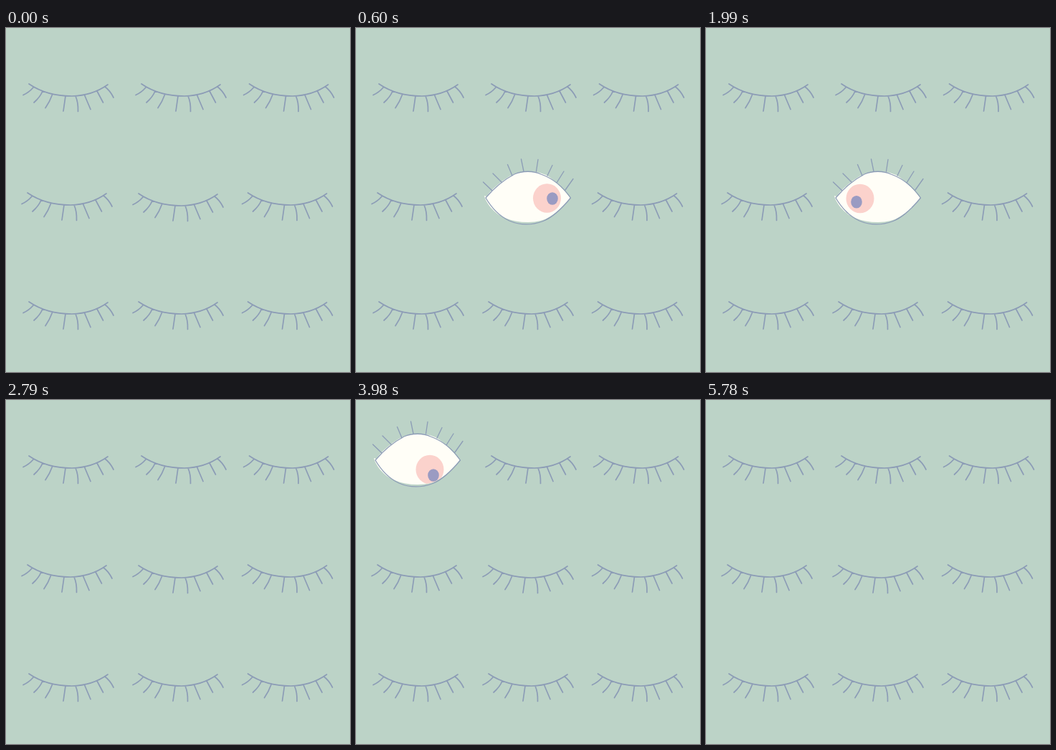
An HTML page that plays this animation: 480 by 480 pixels, repeating every 6.16 s.

```html
<!DOCTYPE html>
<html lang="en">
<head>
<meta charset="utf-8">
<title>Blinking eyes</title>
<style>
  html, body { margin: 0; height: 100%; overflow: hidden; background: #bcd3c7; }
  svg { display: block; width: 100vw; height: 100vh; }
  .line { fill: none; stroke: #8c9cb6; stroke-width: 1.7; stroke-linecap: round; stroke-linejoin: round; }
  .thin { stroke-width: 1.3; }
  .white { fill: #fffef7; }
  .iris { fill: #fbd2cc; }
  .pupil { fill: #9a9bc2; }
</style>
</head>
<body>
<svg viewBox="0 0 480 480">
  <defs>
    <path id="closed" class="line" d="M32 78C48 89 70 95 92 95C113 94.5 128 89 142 79
      M38 83Q32 90 24 93.5M51 88Q48 96 39 104M65 92Q61 103 55 111.5M83 95L80 116
      M97 95Q101 104 100.5 116.5M109.5 93.5L118 113.5M127 88L135.5 104M138 82Q145 87 150 97"/>
    <path id="openWhite" d="M25 81C27 90 38 106 54 112Q68 118 86 118Q105 118 117 110Q133 101 145 84
      Q131 66 116 55Q104 47 86 47Q67 47 51 60Q37 70 28 82Z"/>
    <path id="halfWhite" d="M28 81L41 73Q50 70 65 69Q90 66.500 115 70Q133 74 145 81Q130 88 113 93Q90 97 64 96Q45 89 28 81Z"/>
    <clipPath id="openClip"><use href="#openWhite"/></clipPath>
    <clipPath id="halfClip"><use href="#halfWhite"/></clipPath>
  </defs>

  <g id="lids"></g>

  <g id="open">
    <use href="#openWhite" class="white"/>
    <g clip-path="url(#openClip)">
      <ellipse id="iris" class="iris" rx="19.5" ry="20.3"/>
      <ellipse id="pupil" class="pupil" rx="7.8" ry="8.8"/>
    </g>
    <path class="line thin" d="M27 84C38 71 50 60 67 51C78 46 94 46 104 51C121 57 135 69 145.500 84
      C134 98 121 111 107 116.500C91 122.500 74 122 60 116C45 109 34 96 27 84Z
      M36 74L23.500 62M49 62L37 50M64 53L57.500 37.500M80 47L76.500 30M97.500 47L100 30.500
      M113 53L120 38.500M126 63L136 47M138 73L149 57.500"/>
  </g>

  <g id="half">
    <use href="#halfWhite" class="white"/>
    <g clip-path="url(#halfClip)">
      <ellipse class="iris" cx="111.500" cy="83" rx="19.500" ry="20.300"/>
      <ellipse class="pupil" cx="117" cy="87" rx="7.200" ry="7.500"/>
    </g>
    <path class="line" d="M28 81Q44 73 65 69.500Q90 66.500 115 70Q133 74 145 81Q130 88 113 93Q90 97 64 96Q45 89 28 81Z
      M44 73Q40 65 38.500 57M55 70.500Q50.500 62 50.500 54M69 69L64.500 53M82 68L79.500 51.500
      M97 68Q99 60 98.500 53.500M110 69Q113 62 113 56M124 72Q127 65 126.500 59M136 75Q139 70 138.500 65"/>
  </g>
</svg>
<script>
const LOOP = 6160, TOP_LEFT = 0, CENTER = 4;
const $ = id => document.getElementById(id);

const lidSpots = [[0, 0], [157, 0], [307.5, 0], [-2, 152], [153, 153], [305.5, 152], [0, 304], [153, 304], [305.5, 304]];
const openSpots = { [TOP_LEFT]: [0, 0], [CENTER]: [154, 153] };
const halfSpots = { [TOP_LEFT]: [0, 0], [CENTER]: [154, 155] };

// start time, eye, pose, iris x, iris y, pupil offset x, pupil offset y
const poses = [
  [0, CENTER, 'closed'],
  [170, CENTER, 'open', 84, 85.5, 0, 0],
  [370, CENTER, 'open', 96.5, 85.5, 3, 0],
  [600, CENTER, 'open', 112.5, 84.5, 7.5, 0.5],
  [830, CENTER, 'open', 90, 84.5, 0, 0],
  [1030, CENTER, 'open', 73, 84.5, -5, 0],
  [1260, CENTER, 'open', 61, 85, -10.5, -9],
  [1990, CENTER, 'open', 61, 85, -5, 4.7],
  [2390, CENTER, 'half'],
  [2790, CENTER, 'closed'],
  [3320, TOP_LEFT, 'open', 84, 84.5, 0, 0],
  [3750, TOP_LEFT, 'open', 95.5, 88.5, 3, 4],
  [3980, TOP_LEFT, 'open', 103, 97, 5, 8],
  [5050, TOP_LEFT, 'half'],
  [5780, TOP_LEFT, 'closed'],
];

const lids = lidSpots.map(([x, y]) => {
  const lid = document.createElementNS('http://www.w3.org/2000/svg', 'use');
  lid.setAttribute('href', '#closed');
  place(lid, x, y);
  return $('lids').appendChild(lid);
});

function place(el, x, y) {
  el.setAttribute('transform', `translate(${x} ${y})`);
}

function show(el, visible) {
  el.style.display = visible ? '' : 'none';
}

function draw(now) {
  const t = now % LOOP;
  const [, eye, pose, x, y, dx, dy] = poses.findLast(p => p[0] <= t);
  lids.forEach((lid, i) => show(lid, i !== eye || pose === 'closed'));
  show($('open'), pose === 'open');
  show($('half'), pose === 'half');
  place($('open'), ...openSpots[eye]);
  place($('half'), ...halfSpots[eye]);
  if (pose === 'open') {
    place($('iris'), x, y);
    place($('pupil'), x + dx, y + dy);
  }
}

function tick() {
  draw(performance.now());
  requestAnimationFrame(tick);
}
tick();
</script>
</body>
</html>
```
